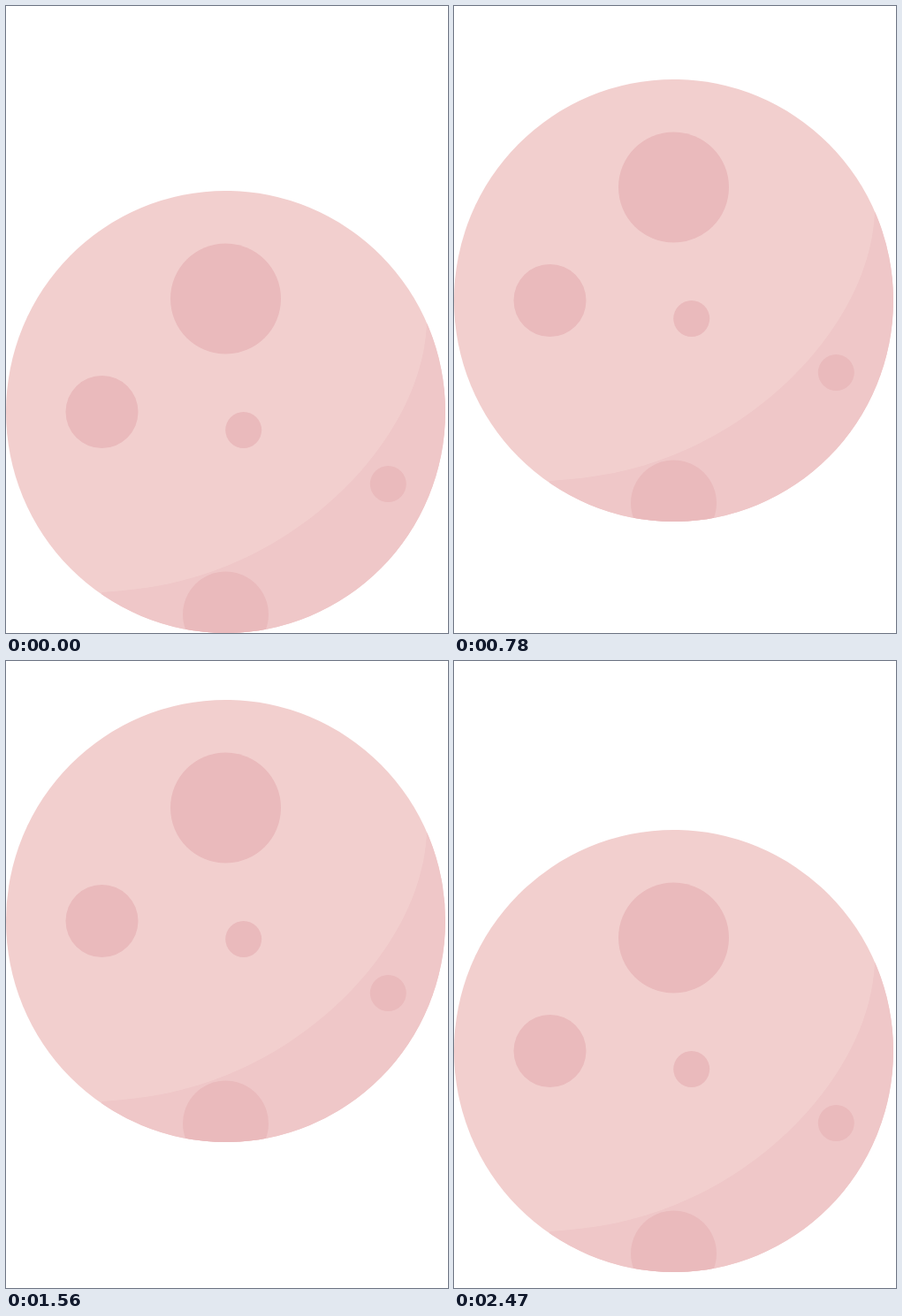
An HTML page for the animation above (2730 ms loop, 500 by 709 pixels).

```html
<!DOCTYPE html>
<html lang="en">
<head>
<meta charset="utf-8">
<title>Floating moon</title>
<style>
  html, body { margin: 0; width: 100%; height: 100%; overflow: hidden; background: #fff; }
  svg { display: block; }
</style>
</head>
<body>
<svg width="500" height="709" viewBox="0 0 500 709">
  <clipPath id="disc"><ellipse cx="248.5" cy="250" rx="248.5" ry="250"/></clipPath>
  <g id="moon">
    <g clip-path="url(#disc)">
      <rect width="497" height="500" fill="#f2cfce"/>
      <path fill="#efc7c8" d="M108 454C160 451 207 442 250 424C370 376 472 262 476 149L500 149V500H108Z"/>
      <g fill="#eababc">
        <circle cx="248.5" cy="122" r="62.5"/>
        <circle cx="108.5" cy="250" r="41"/>
        <circle cx="268.7" cy="270.5" r="20.5"/>
        <circle cx="432.3" cy="331.5" r="20.5"/>
        <circle cx="248.5" cy="479" r="48.5"/>
      </g>
    </g>
  </g>
</svg>
<script>
  const LOOP = 2730, STEP = 130, SPEED = 21, LOW = 209, HIGH = 2, TURN = 10, LAST = 19;
  const moon = document.getElementById('moon');
  const start = performance.now();

  // Rise to the top, then sink; the last step is held until the loop restarts.
  function topAt(ms) {
    const step = Math.min(LAST, Math.floor(ms / STEP));
    return step <= TURN
      ? Math.max(HIGH, LOW - SPEED * step)
      : HIGH + SPEED * (step - TURN);
  }

  function draw() {
    const ms = Math.max(0, performance.now() - start) % LOOP;
    moon.setAttribute('transform', `translate(0 ${topAt(ms)})`);
    requestAnimationFrame(draw);
  }
  draw();
</script>
</body>
</html>
```
